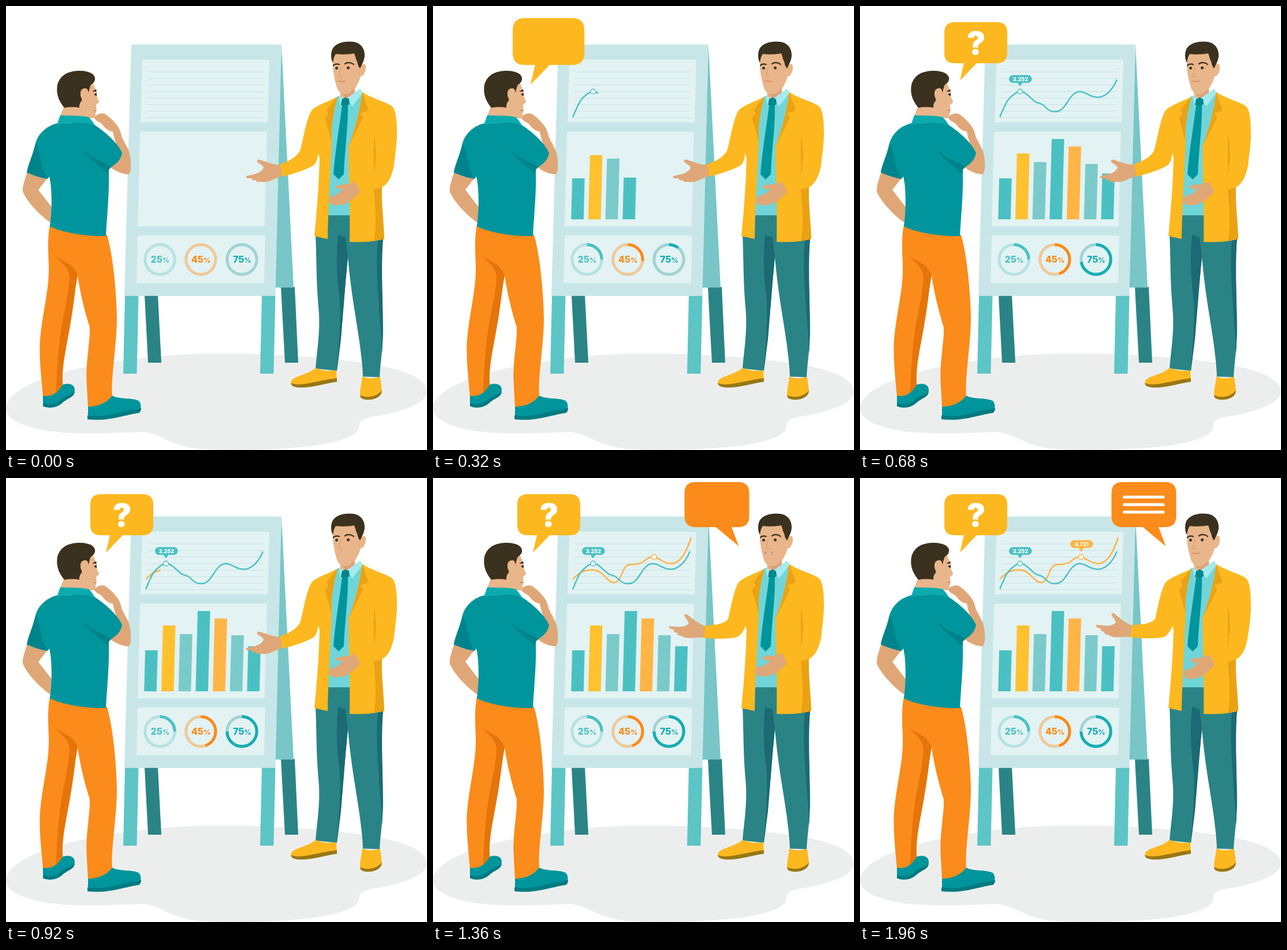
These frames come from a looping animation (729 by 768 pixels, 2000 ms). An HTML page:

```html
<!DOCTYPE html>
<html lang="en">
<head>
<meta charset="utf-8">
<title>Presentation</title>
<style>
  html, body { margin: 0; width: 100%; height: 100%; overflow: hidden; background: #fff; }
  svg { display: block; width: 729px; height: 768px; }
  text { font-family: Inter, "Open Sans", sans-serif; font-weight: 800; text-anchor: middle; }
  .skin { fill: #dfa777; }
  .face { fill: #e9b58a; }
  .hair { fill: #3b311f; }
  .teal { fill: #00959c; }
  .tealDark { fill: #00838a; }
  .orange { fill: #fb8b1a; }
  .orangeDark { fill: #e57509; }
  .yellow { fill: #fdb81f; }
  .yellowDark { fill: #eaa214; }
  .pants { fill: #2a8485; }
  .pantsDark { fill: #1b6a74; }
  .frame { fill: #c8e6e7; }
  .panel { fill: #e3f2f3; }
  .leg { fill: #5dc5c6; }
  .curve { fill: none; stroke-width: 2.4; stroke-linecap: butt; }
  .thin { fill: none; stroke-linecap: round; }
</style>
</head>
<body>
<svg viewBox="0 0 729 768">
  <path fill="#eceeed" d="M0 696C0 667 60 641 130 626C200 611 280 601 370 601C480 601 600 611 665 626C710 637 729 652 729 667C729 686 690 700 650 708C630 711 614 713 612 724C614 742 585 753 530 761C470 768 390 770 335 766C283 761 268 739 238 737C190 738 150 741 100 738C40 733 0 718 0 696Z"/>

  <g id="board">
    <path class="pants" d="M240 501H263L269 617H246ZM476 486H500L506 617H483Z"/>
    <path fill="#78c6c7" d="M477 67L498 487H464Z"/>
    <path class="leg" d="M206 500H229.500L226.500 636H203ZM443 500H466.500L463.500 636H440Z"/>
    <path class="frame" d="M217 66.500H477L466.500 501.500H205Z"/>
    <path class="panel" d="M236 93H456L453 201.500H233ZM232 217.500H452L448 381H228ZM228 397H449L447 479.500H226Z"/>
    <g id="rules" stroke="#c2dfe1" stroke-width=".9"></g>
    <path id="curveB" class="curve" stroke="#ffb143" pathLength="1" d="M242 175C250 168 256 159 275 159C296 159 300 180 313 181C328 181 326 150 341 150C353 150 363 147 369 141C374 137 378 136 383 137C393 139 398 147 412 148C430 148 440 124 447 103"/>
    <path id="curveA" class="curve" stroke="#4bc0c2" pathLength="1" d="M242 192.500C246 183 251 170 256 163C261 157 268 149 277 148C289 148 297 163 306 167C313 169 317 170 321 175C328 182 336 184 343 182C358 178 362 150 380 148C392 148 400 160 416 157.500C430 154 439 141 445 127"/>
    <g id="dotA"><circle cx="277" cy="148" r="4.300" fill="#fff" stroke="#4bc0c2" stroke-width="1.400"/></g>
    <g id="dotB"><circle cx="383" cy="136.500" r="4.300" fill="#fff" stroke="#ffb143" stroke-width="1.400"/></g>
    <g id="tagA" fill="#4bc0c2">
      <rect x="258" y="119.500" width="39.500" height="13.500" rx="6.700"/><path d="M272 132H282L277 139Z"/>
      <text x="277.700" y="129.600" font-size="9.200" fill="#fff">3.252</text>
    </g>
    <g id="tagB" fill="#ffb545">
      <rect x="364" y="107.500" width="39.500" height="13.500" rx="6.700"/><path d="M378 120H388L383 128Z"/>
      <text x="383.700" y="117.600" font-size="9.200" fill="#fff">4.721</text>
    </g>
    <g id="bars" transform="translate(0 369) skewX(-1.500)"></g>
    <g id="rings"></g>
  </g>

  <g id="listener">
    <path class="skin" d="M37 286C33 300 28 312 29 321C36 338 58 362 80 377L83 352C74 342 64 328 56 318L73 296Z"/>
    <path class="skin" d="M180 278C190 286 203 292 213 291C218 284 217 262 212 249C207 237 200 229 199 220C196 209 186 197 172 187C165 184 157 187 153 193C153 197 160 200 166 204C172 212 178 217 185 217C187 230 192 245 201 256Z"/>
    <path class="face" d="M101 172L94 190C112 202 135 202 146 200L141 192C148 196 155 195 156 190C154 187 155 184 157 183L154 180L157 177C155 174 156 170 158 169C161 168 162 166 160 163C157 158 156 152 156 146L150 132L130 140Z"/>
    <path class="hair" d="M101 176C93 166 87 155 88.500 140C91 121 106 112.500 126 112C139 112 152 115 154 124C155 130 151 134 147 136C145 140 144 145 143 150C140 140 130 141 129 150C128 156 133 160 131 164C127 168 127 172 127 176C116 174 108 175 101 176Z"/>
    <path class="face" d="M134 143C140 140 144 146 142 153C140 160 137 164 133 163C128 158 127 147 134 143Z"/>
    <path class="hair" d="M149 148L156 144L157 148ZM152 153L157 150V156Z"/>
    <path fill="none" stroke="#b87750" stroke-width="1.300" d="M152 181L157 180"/>
    <path class="orange" d="M76 378C70 410 75 440 74 462C73 500 60 545 58.500 588C58 620 62 650 64 676C80 677 96 669 98 653C96 620 107 580 113 540C118 510 120 485 124 466C129 500 137 530 145 556C146 580 138 615 139.500 648L142 694C164 695 181 687 184 677C181 645 192 585 192 540C191 490 185 430 175 396Z"/>
    <path class="orangeDark" d="M84 432C97 441 118 446 124 466C120 485 118 510 113 540C107 580 96 620 98 653C96 663 91 667 87 669C88 625 92 575 99 540C106 502 113 471 108 460C104 449 93 440 84 432Z"/>
    <path class="teal" d="M88 203C69 208 55 222 51 238C46 260 39 272 36 288C48 293 60 297 72 299L75 295C80 315 80 350 76 381C97 392 140 399 173 398C175 360 179 325 178 290C176 284 179 280 183 278C192 273 200 264 201 254C194 238 174 218 146 201Z"/>
    <path class="tealDark" d="M51 238C62 258 58 276 72 299C60 297 48 293 36 288C39 272 46 260 51 238ZM132 247C147 263 164 268 183 278L178 283V292C165 278 143 266 132 247Z"/>
    <path fill="#0aabae" d="M88 206L94 189C110 190 128 189 143 192C147 196 152 202 154 207C144 203 137 201 128 202C114 203 101 201 88 206Z"/>
    <path class="teal" d="M64 674C78 677 90 670 98 655C107 652 118 653 119 663C119 676 107 678 98 686C89 695 74 696 64 692ZM142 693C159 693 174 687 184 674C198 681 218 677 230 683C235 689 234 696 231 701C207 704 184 715 142 712Z"/>
    <path fill="#007b82" d="M64 687C82 692 92 684 101 676C109 672 116 671 119 666C119 677 107 678 98 686C89 695 74 697 64 692ZM141 708C168 712 190 705 208 700C220 698 229 698 234 695C234 699 233 702 230 704C205 707 181 719 141 715Z"/>
  </g>

  <g id="speaker">
    <path class="pants" d="M556 355H596L653 402C648 440 653 510 653 565C652 596 648 620 647 642L618 641C617 612 612 580 607 548C601 512 595 470 592 434C587 485 583 540 580 575L573 631L536 627C539 590 545 560 541 520C537 476 538 436 536 396Z"/>
    <path class="pantsDark" d="M575 396C571 440 573 470 577 500C581 550 575 590 573 631L580 575C583 540 587 485 592 434L588 400ZM644 402C640 450 644 490 646 520C648 560 652 585 651 606C655 540 648 460 653 402Z"/>
    <path class="yellow" d="M536 626C548 631 560 632 572 630L573 648C555 650 533 660 508 659C496 658 491 654 495 647C503 639 524 637 536 626ZM617 641C627 645 638 645 648 641C649 654 652 662 650 668C643 679 626 682 614 677C611 667 616 655 617 641Z"/>
    <path fill="#987713" d="M493 652C510 660 540 647 573 644V650C555 652 534 660 510 660C500 660 493 657 493 652ZM613 673C627 680 644 674 651 665C651 675 640 681 627 681C619 681 613 679 613 673Z"/>

    <path fill="#70d5d9" d="M574 156L617 150L610 200L596 240L597 362H556L560 200Z"/>
    <path class="face" d="M578 142L579 157L588 162L604 152V125Z"/>
    <path fill="#dba276" d="M581 150C592 154 600 147 604 138V150L588 161Z"/>
    <path fill="#a6eaec" d="M576 155L586 161L580 174ZM588 161L613 143L618 150L600 173Z"/>
    <path fill="#00868d" d="M582 161L588 158L594 161L595 169L589 175L580 171Z"/>
    <path class="teal" d="M582 172L592 171C593 210 586 250 585 291L576 300L567 291C570 250 577 212 582 172Z"/>

    <path class="yellow" d="M574 157C558 165 535 173 529 181C522 191 516 222 510 249C516 261 530 266 539 250L543 262C542 310 538 355 534 398L557 403C558 340 562 285 564 235C562 205 568 180 574 157ZM617 149C636 161 656 165 668 173C676 180 677 202 677 223C676 252 671 280 667 292L650 314C650 345 654 375 655 403C636 408 615 409 595 408C596 350 594 300 593 243C604 215 613 180 617 149Z"/>
    <path class="yellowDark" d="M573 157L555 180L559 186L552 193L564 235C562 205 568 180 574 157ZM617 149L628 181L613 186L619 192L593 243C604 215 613 180 617 149ZM638 221C635 255 639 275 636 300C637 335 644 370 637 406L655 403C654 370 650 345 651 312L643 300C640 270 641 245 638 221Z"/>

    <g id="frontArm">
      <path class="skin" d="M610 305C604 303 596 307 590 308C583 309 575 309 571 312C570 316 577 318 584 316C580 323 572 327 563 329C558 331 558 334 562 334C556 336 556 341 563 341C564 346 574 345 580 344C592 342 601 335 613 322Z"/>
      <path class="yellow" d="M638 290C628 297 618 301 606 305L613 321C632 317 646 317 655 311C665 303 671 286 673 268L640 268Z"/>
    </g>
    <g id="pointArm">
      <path class="skin" d="M477 275C457 274 448 268 438 265.500C433 266 434 270 438 272C442 275 446 277 446 280C443 286 437 289 430 291L417 294C414 296 416 298 420 298L426 298C424 301 428 302 433 301C432 304 437 305 442 304C455 307 465 297 480 294Z"/>
      <path class="yellow" d="M512 240C509 260 494 266 474 274C477 281 478 288 478 295C500 290 520 283 532 276C540 270 541 256 541 244Z"/>
    </g>

    <path class="face" d="M566 88C565 115 570 130 573 141C576 150 583 154 590 152C601 149 609 139 614 122C620 121 624 112 623 103C621 99 617 100 614 103L608 76L570 76Z"/>
    <path class="hair" d="M566 98C562 92 562 80 566 73C573 63 588 60 602 62C615 64 622 75 621 87C620 94 618 98 615 104L613 108C609 104 609 97 607 94C605 90 605 86 603 82C592 84 581 84 571 83C568 87 567 92 566 98Z"/>
    <path class="thin" stroke="#3b311f" stroke-width="2.200" d="M567 103C569 100 573 100 577 101M587 100C591 97 597 97 602 101"/>
    <g id="eyes" class="hair"><circle cx="572.500" cy="107.500" r="2.400"/><circle cx="592.500" cy="107" r="2.500"/></g>
    <path class="thin" stroke="#d79b70" stroke-width="1.200" d="M580 107C580 113 577 118 576 121C577 123 580 123 583 122"/>
    <path id="smile" class="thin" stroke="#c98660" stroke-width="1.300" d="M575 129C579 131 583 131 587 130"/>
    <g id="mouth"><path fill="#fff" stroke="#cc7d58" stroke-width="1.200" d="M574.500 128.500C579 129.500 583 129.500 588 128.500C585 135 577 134 574.500 128.500Z"/></g>
  </g>

  <g id="bubbleA">
    <path class="yellow" d="M164 28H237Q255 28 255 46V81Q255 99 237 99H202L173 129L180 99H164Q146 99 146 81V46Q146 28 164 28Z"/>
    <g id="question"><text x="201" y="83.500" font-size="55" fill="#fff" style="font-weight:900">?</text></g>
  </g>
  <g id="bubbleB">
    <path class="orange" d="M454.500 7H528.500Q547.500 7 547.500 26V66Q547.500 85 528.500 85H517L529.500 118L490 85H454.500Q435.500 85 435.500 66V26Q435.500 7 454.500 7Z"/>
    <g id="notes" class="thin" stroke="#fff" stroke-width="5"></g>
  </g>
</svg>

<script>
const LOOP = 2000, STEP = 40;
const $ = id => document.getElementById(id);

function add(parent, tag, attrs, text) {
  const el = document.createElementNS('http://www.w3.org/2000/svg', tag);
  for (const key in attrs) el.setAttribute(key, attrs[key]);
  if (text) el.textContent = text;
  parent.appendChild(el);
  return el;
}

// Linear value along [time, value] keys
function track(t, keys) {
  if (t <= keys[0][0]) return keys[0][1];
  for (let i = 1; i < keys.length; i++) {
    const [t0, v0] = keys[i - 1], [t1, v1] = keys[i];
    if (t < t1) return v0 + (v1 - v0) * (t - t0) / (t1 - t0);
  }
  return keys[keys.length - 1][1];
}
const clamp = x => Math.min(1, Math.max(0, x));
const span = (t, from, to) => clamp((t - from) / (to - from));
const sine = p => (1 - Math.cos(Math.PI * p)) / 2;
const cubic = p => p < .5 ? 4 * p ** 3 : 1 - 4 * (1 - p) ** 3;

function scale(el, cx, cy, sx, sy = sx) {
  el.style.display = sx > 0 && sy > 0 ? '' : 'none';
  el.setAttribute('transform', `translate(${cx} ${cy}) scale(${sx} ${sy}) translate(${-cx} ${-cy})`);
}
const turn = (el, angle, cx, cy) => el.setAttribute('transform', `rotate(${angle} ${cx} ${cy})`);

function trace(el, part) {
  el.style.display = part > 0 ? '' : 'none';
  el.setAttribute('stroke-dasharray', part >= 1 ? 'none' : `${part} 2`);
}
const pop = (t, at) => track(t, [[at, 0], [at + 70, 1.1], [at + 120, 1]]);
const inflate = (t, at) => track(t, [[at, 0], [at + 120, .955], [at + 160, 1.086], [at + 210, 1.138], [at + 400, 1]]);

for (let i = 0; i < 8; i++) {
  const y = 114 + i * 11.3;
  add($('rules'), 'path', { d: `M${245 - i * .3} ${y}H${446 - i * .2}` });
}

const bars = [
  [71, '#4bc0c2'], [114, '#ffc12e'], [99, '#7bcaca'], [139, '#4bc0c2'],
  [126, '#ffb545'], [97, '#7bcaca'], [78, '#4bc0c2']
].map(([h, fill], i) => ({
  h, start: i * 80,
  el: add($('bars'), 'rect', { x: 239.2 + i * 29.7, width: 21.6, fill })
}));

const rings = [
  { x: 266.5, value: 25, back: '#b5e1e2', front: '#4bc0c2', from: 0, to: 320 },
  { x: 337.3, value: 45, back: '#eec999', front: '#fb8b1a', from: 90, to: 500 },
  { x: 408.5, value: 75, back: '#a0d3d5', front: '#14adb2', from: 180, to: 750 }
];
for (const r of rings) {
  const circle = { cx: r.x, cy: 438.5, r: 25.7, fill: 'none', 'stroke-width': 5 };
  add($('rings'), 'circle', { ...circle, stroke: r.back });
  r.arc = add($('rings'), 'circle', {
    ...circle, stroke: r.front, pathLength: 1, transform: `rotate(-90 ${r.x} 438.5)`
  });
  const label = add($('rings'), 'text', { x: r.x + .3, y: 444.3, 'font-size': 16, fill: r.front }, String(r.value));
  add(label, 'tspan', { 'font-size': 12 }, '%');
}

const notes = [33, 46, 59].map(y => add($('notes'), 'path', { d: `M457.500 ${y}H525` }));

function draw(t) {
  for (const b of bars) {
    const grow = track(t - b.start, [[0, 0], [80, .52], [140, 1.05], [160, 1.06], [240, .974], [320, 1]]);
    b.el.setAttribute('y', -b.h * grow);
    b.el.setAttribute('height', b.h * grow);
  }
  for (const r of rings) trace(r.arc, sine(span(t, r.from, r.to)) * r.value / 100);

  trace($('curveA'), cubic(span(t, 160, 560)));
  trace($('curveB'), cubic(span(t, 760, 1280)));
  scale($('dotA'), 277, 148, pop(t, 200));
  scale($('dotB'), 383, 136.5, pop(t, 940));
  scale($('tagA'), 277, 139, pop(t, 550));
  scale($('tagB'), 383, 128, pop(t, 1420));

  scale($('bubbleA'), 203, 78, inflate(t, 110));
  scale($('question'), 201, 64, pop(t, 430));
  scale($('bubbleB'), 491.5, 65, inflate(t, 960));
  notes.forEach((el, i) => {
    const p = sine(span(t, 1380 + i * 70, 1520 + i * 70));
    el.style.display = p > 0 ? '' : 'none';
    el.setAttribute('d', `M457.500 ${33 + i * 13}h${67.5 * p}`);
  });

  const lift = 18.5 * sine(span(t, 1060, 1350));
  turn($('pointArm'), lift + track(t, [[1360, 0], [1640, 2], [1960, 1]]), 530, 255);
  turn($('frontArm'), track(t, [[1060, 0], [1360, 1], [1680, -.5], [1960, -2]]), 655, 290);

  scale($('eyes'), 582, 107.5, 1, track(t, [[1000, 1], [1080, .4], [1160, 1]]));
  const open = track(t, [[900, 0], [1000, 1], [1080, 1], [1200, .4], [1300, .9], [1360, .7], [1500, .4], [1600, .9], [1680, .6], [1860, 0]]);
  scale($('mouth'), 581, 128.5, 1, open);
  $('smile').style.display = open > 0 ? 'none' : '';
}

const began = performance.now();
function tick() {
  const t = (performance.now() - began) % LOOP;
  draw(Math.floor(t / STEP) * STEP);
  requestAnimationFrame(tick);
}
tick();
</script>
</body>
</html>
```
